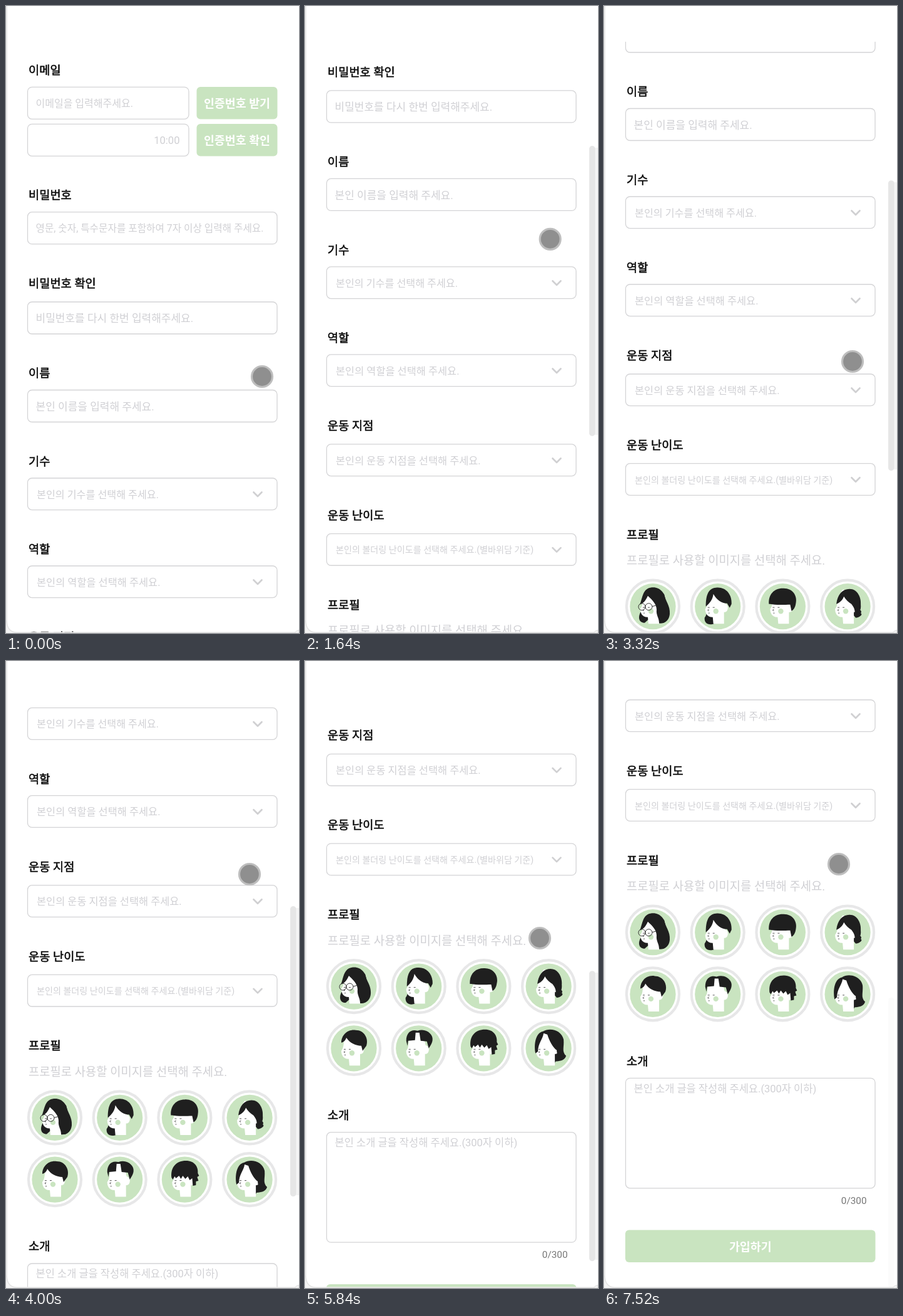
An HTML page that plays this animation: 468 by 1000 pixels, repeating every 8.24 s.

```html
<!DOCTYPE html>
<html lang="ko">
<head>
<meta charset="utf-8">
<title>회원가입</title>
<style>
html, body { margin: 0; width: 100%; height: 100%; overflow: hidden; background: #fff; }
svg { display: block; width: 468px; height: 1000px; }
text { font-family: Roboto, "Noto Sans CJK KR", "Noto Sans CJK", "Noto Sans CJK JP", sans-serif; }
</style>
</head>
<body>
<svg viewBox="0 0 468 1000">
  <defs><clipPath id="view"><rect y="57" width="468" height="941.5"/></clipPath></defs>
  <rect width="468" height="1000" fill="#fff"/>
  <g clip-path="url(#view)"><g id="page"></g></g>
  <g id="bar">
    <rect x="462" y="3" width="14" height="458" fill="#f4f4f4"/>
    <rect x="454" width="9.5" height="463" rx="4.7" fill="#e6e6e6"/>
  </g>
  <path d="M0 980V1000H20Q1.500 1000 1.500 980Z" fill="#f4f4f4"/>
  <path d="M1.200 0V980Q1.200 999.300 19 999.300H468" fill="none" stroke="#e2e2e2" stroke-width="1.400"/>
  <path d="M461 1000Q463 996 468 995.500V1000Z" fill="#f6f6f6" stroke="#dcdcdc"/>
  <circle id="dot" r="16.500" fill="#8f8f8f" stroke="#bebebe" stroke-width="3.200"/>
</svg>
<script>
const GREEN = '#c9e4c0', HINT = '#d0d0d4', INK = '#1f1f1f';
const LOOP = 8240, STEP = 40;

const text = (x, y, size, str, fill = HINT, more = '') =>
  `<text x="${x}" y="${y + size * 0.38}" font-size="${size}" fill="${fill}" ${more}>${str}</text>`;
// A thin outline gives the medium weight between regular and bold.
const label = (y, str) => text(36, y, 18.7, str, '#0c0c0c', 'stroke="#0c0c0c" stroke-width=".55"');
const box = (y, w = 399, h = 51) =>
  `<rect x="34.500" y="${y}" width="${w - 0.5}" height="${h}" rx="7" fill="#fff" stroke="#d4d4d6" stroke-width="1.300"/>`;
const button = (x, y, w, str) =>
  `<rect x="${x}" y="${y}" width="${w}" height="51.500" rx="6" fill="${GREEN}"/>` +
  text(x + w / 2, y + 26.5, 18.4, str, '#fff', 'font-weight="700" text-anchor="middle"');
const input = (y, size, str) => box(y) + text(47.5, y + 25.7, size, str);
const select = (y, size, str) => box(y, 399, 50.6) + text(49, y + 25.5, size, str) +
  `<path d="M395.500 ${y + 22.5}l6.500 6.500 6.500-6.500" fill="none" stroke="#d0d0d2" stroke-width="2.700" stroke-linecap="round" stroke-linejoin="round"/>`;

// Each look: hair behind the face, hair in front of it.
const looks = [
  ['M-19 8C-24 16-23 26-13 26L-4 18ZM0-26L18-20C20-8 28-2 27 12C26 24 16 29 7 26L0 10Z',
   'M-21-3C-17-10-17-28-4-30C10-33 20-22 20-10C22 0 28 4 26 15C24 25 15 28 10 26C10 18 5 14 6 5C6-3 0-10-8-17C-11-10-15-5-21-3Z'],
  ['M-16-14C-18 2-15 10-21 18C-22 27-14 31-5 27L-3 14Z',
   'M-19 0C-19-14-17-29-3-30C12-32 23-20 22-4L19 2L15-5C6-5-2-11-7-20C-8-11-13-5-19 0Z'],
  ['', 'M-22-4C-23-19-14-29 0-29C15-30 24-18 21-5C20 2 17 6 14 7L12-3C4-3-12-2-20-4Z'],
  ['M10 0L19 2C18 6 24 6 21 11C24 11 22 17 13 18L8 12Z',
   'M-18-4C-16-20-8-28 3-28C16-28 22-14 21-3C22 6 18 12 11 13C13 5 9 0 6-4C1-7-3-11-6-16C-8-10-13-6-18-4Z'],
  ['', 'M-20-9C-20-22-9-31 3-29C17-29 24-15 20-4L14 4L12-4C3-4-7-9-12-17C-13-13-16-10-20-9Z'],
  ['', 'M-20-12C-20-24-13-31-2-28C12-33 23-22 22-14C22-9 19-5 16 0L13-11L3-12L1-25H-5L-6-13L-17-12L-18-4Z'],
  ['', 'M-21-3C-23-20-13-30 2-30C16-30 22-20 21-10L23-6L20-4L22 2L18 3L18 9L13 10L12-2L8 1L5-5L1-1L-3-6L-6-1L-9-6L-14-2L-16-5L-19 0Z'],
  ['M5-20L21-16C25-2 21 6 28 12C25 21 16 20 11 21L8 27Z',
   'M-21 8C-24-8-20-25-9-27C2-34 21-29 24-14C25 0 21 6 24 13C18 19 13 12 13 3C7-1 1-12-2-22L-8-24C-9-15-17-8-17 5Z']
];
const face = 'M-16-14C-16-4-17 0-20 4C-20 9-18 17-8 17L-7 27.500H10V9C17 10 19-3 11-5L6-24L-8-27Z';
const glasses = '<g fill="none" stroke="#333" stroke-width="1"><circle cx="-17.500" cy="0.500" r="5.500"/><circle cx="-6.500" cy="0.500" r="5.500"/><path d="M-1 0L6-2"/></g>';
const avatar = ([back, front], i) => `<g transform="translate(${78 + i % 4 * 103.7} ${i < 4 ? 1406.7 : 1505.4})">
  <circle r="42" fill="#fff" stroke="#e7e7e8" stroke-width="4.200"/><circle r="36.600" fill="${GREEN}"/>
  <path d="${back}" fill="${INK}"/><path d="${face}" fill="#fff"/>
  <circle cx="-3" cy="7.500" r="4.200" fill="${GREEN}"/>
  <path d="M-16 1.500h3M-8 1.500h3M-14 4l-2 2 2 1M-15 10.500h2" fill="none" stroke="#444" stroke-width=".9"/>
  <path d="${front}" fill="${INK}"/>${i ? '' : glasses}</g>`;

const $ = id => document.getElementById(id);
$('page').innerHTML = [
  label(102, '이메일'), box(129.3, 258), text(47.5, 155, 16, '이메일을 입력해주세요.'),
  button(304.5, 129, 129, '인증번호 받기'),
  box(188.3, 258), text(277.5, 214, 16.6, '10:00', HINT, 'text-anchor="end"'),
  button(304.5, 188, 129, '인증번호 확인'),
  label(301, '비밀번호'), input(328.7, 15.7, '영문, 숫자, 특수문자를 포함하여 7자 이상 입력해 주세요.'),
  label(442, '비밀번호 확인'), input(472, 17, '비밀번호를 다시 한번 입력해주세요.'),
  label(585, '이름'), input(612.5, 17, '본인 이름을 입력해 주세요.'),
  label(726, '기수'), select(753, 16.2, '본인의 기수를 선택해 주세요.'),
  label(866, '역할'), select(893, 16.4, '본인의 역할을 선택해 주세요.'),
  label(1006, '운동 지점'), select(1036, 16.4, '본인의 운동 지점을 선택해 주세요.'),
  label(1149, '운동 난이도'), select(1178.7, 14.1, '본인의 볼더링 난이도를 선택해 주세요.(별바위담 기준)'),
  label(1291.5, '프로필'), text(36, 1333, 18.8, '프로필로 사용할 이미지를 선택해 주세요.'),
  ...looks.map(avatar),
  label(1611.5, '소개'), box(1639.3, 399, 175.5), text(47.5, 1655.3, 16.5, '본인 소개 글을 작성해 주세요.(300자 이하)'),
  text(419.5, 1834, 15.3, '0/300', '#777', 'text-anchor="end"'),
  button(34, 1881.5, 399.5, '가입하기')
].join('');

// Monotone cubic through [time, value] points.
function curve(points) {
  const rate = i => (points[i + 1][1] - points[i][1]) / (points[i + 1][0] - points[i][0]);
  const slope = points.map((_, i) => {
    if (!i || i === points.length - 1) return 0;
    const a = rate(i - 1), b = rate(i);
    return a * b > 0 ? 2 * a * b / (a + b) : 0;
  });
  return t => {
    if (t <= points[0][0]) return points[0][1];
    const i = points.findIndex(p => p[0] > t) - 1;
    if (i < 0) return points[points.length - 1][1];
    const [t0, a] = points[i], [t1, b] = points[i + 1], d = t1 - t0, u = (t - t0) / d;
    const ease = u * u * (3 - 2 * u);
    return a + (b - a) * ease + d * u * (1 - u) * ((1 - u) * slope[i] - u * slope[i + 1]);
  };
}

const hand = [
  [0, 409, 591], [520, 396, 711], [680, 396, 711], [1200, 390, 560], [1800, 392, 344],
  [2120, 392, 344], [2480, 406, 511], [2920, 403, 655], [3040, 403, 655], [3320, 397, 567],
  [4000, 389, 340], [4160, 388, 328], [4280, 388, 328], [5100, 392, 645], [5130, 392, 645],
  [5840, 375, 442], [6280, 375, 324]
];
const handX = curve(hand.map(k => [k[0], k[1]]));
const handY = curve(hand.map(k => [k[0], k[2]]));
const scroll = curve([
  [700, 0], [1200, 139], [1800, 367], [3060, 367], [3320, 449], [4000, 678.3],
  [4160, 690], [5140, 690], [5840, 887.6], [6200, 974]
]);

function draw(t) {
  const s = scroll(t);
  $('page').setAttribute('transform', `translate(0 ${-s})`);
  $('bar').setAttribute('transform', `translate(0 ${57 + s * 0.4925})`);
  $('bar').setAttribute('opacity', t < 720 ? 0 : t < 7520 ? 1 : 0.15);
  $('dot').setAttribute('transform', `translate(${handX(t)} ${handY(t)})`);
}

const start = performance.now();
function tick() {
  const t = (performance.now() - start) % LOOP;
  draw(Math.floor(t / STEP) * STEP);
  requestAnimationFrame(tick);
}
tick();
</script>
</body>
</html>
```
